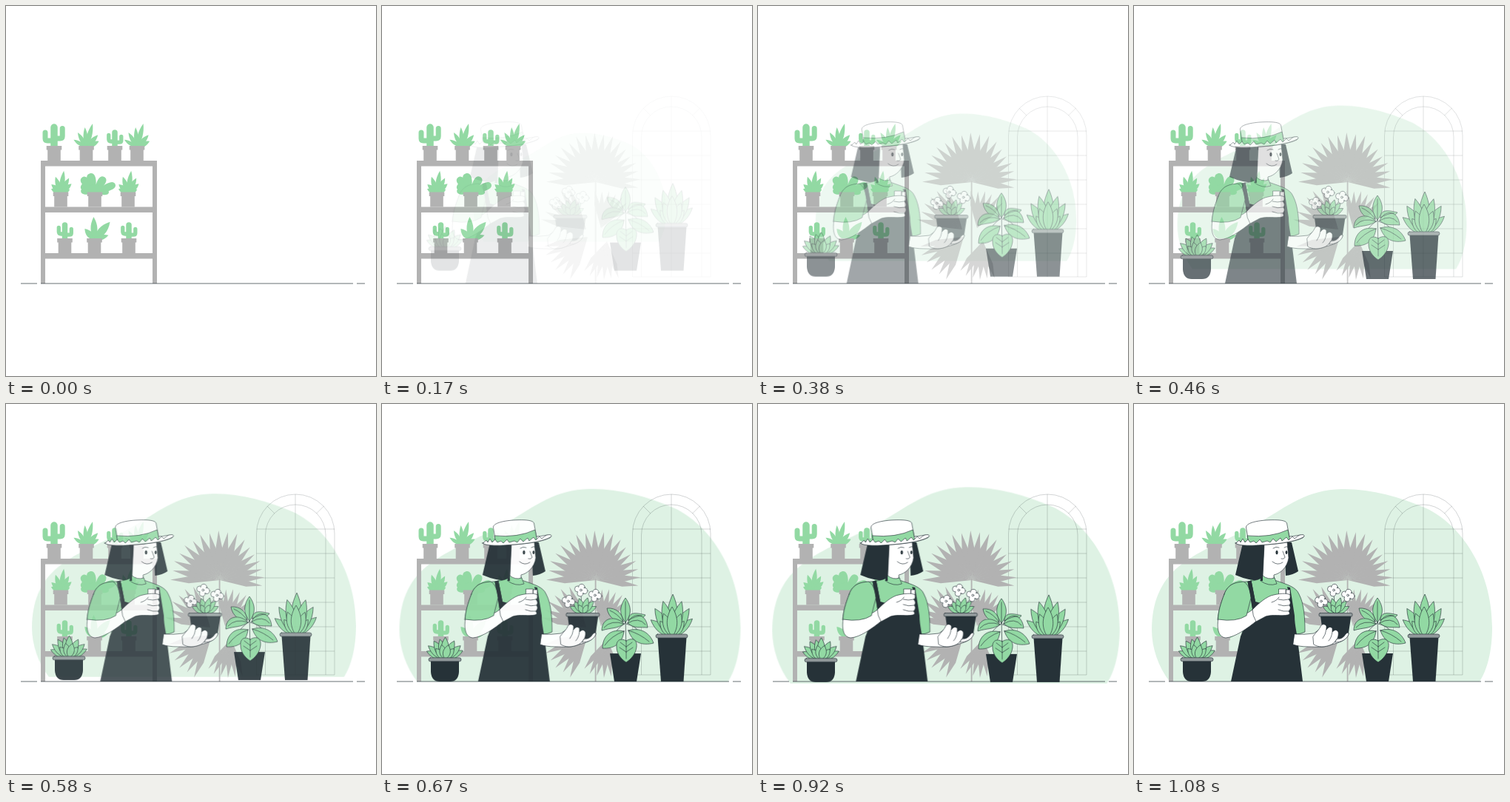
An HTML page without scripts that plays this animation: 500x500 px, repeating every 1120 ms.

```html
<!DOCTYPE html>
<html lang="en">
<head>
<meta charset="utf-8">
<title>Plant shop</title>
<style>
html, body { margin: 0; width: 100%; height: 100%; overflow: hidden; background: #fff; }
svg { display: block; width: 100%; height: 100%; }
.green { fill: #92d9a3; }
.gray { fill: #b2b2b2; }
.dark { fill: #263238; }
.white { fill: #fff; }
.rim { fill: #929a9c; }
.ink { stroke: #263238; stroke-width: .65; stroke-linejoin: round; stroke-linecap: round; }
.line { fill: none; }
.cactus { fill: none; stroke: #92d9a3; stroke-linecap: round; }
#leaf, #rib { vector-effect: non-scaling-stroke; }

.blob, .fade, .drop, .slide { animation: 1120ms infinite; }
.blob { animation-name: zoom; transform-origin: 254px 245px; }
.fade { animation-name: fade; }
.drop { animation-name: drop; }
.slide { animation-name: slide; }
@keyframes zoom {
  0% { opacity: 0; transform: scale(.5); animation-timing-function: cubic-bezier(.352,.041,.5,1.373); }
  88.2%, 100% { opacity: 1; transform: none; }
}
@keyframes fade {
  0% { opacity: 0; animation-timing-function: cubic-bezier(.352,.041,.5,1.373); }
  88.2%, 100% { opacity: 1; }
}
@keyframes drop {
  0% { opacity: 0; transform: translateY(-20px); animation-timing-function: cubic-bezier(.352,.041,.5,1.373); }
  88.2%, 100% { opacity: 1; transform: translateY(0); }
}
@keyframes slide {
  0% { opacity: 0; transform: translateX(-20px); animation-timing-function: cubic-bezier(.36,-.01,.5,1.38); }
  96.4%, 100% { opacity: 1; transform: translateX(0); }
}
</style>
</head>
<body>
<svg viewBox="0 0 500 500">
<defs>
  <path id="leaf" d="M0 0C-.5-.3-.5-.65 0-1C.5-.65 .5-.3 0 0Z"/>
  <path id="oval" d="M0 0C-.3-.3-.65-1 0-1S.3-.3 0 0Z"/>
  <g id="veined"><use href="#leaf"/><path id="rib" class="line" d="M0 0V-.85"/></g>
  <path id="pot" class="gray" d="M-10.3-20H10.3V-14.5H8.8V0H-8.8V-14.5H-10.3Z"/>
  <g id="cactus">
    <path class="cactus" stroke-width="7.5" d="M0-18V-38"/>
    <path class="cactus" stroke-width="5.3" d="M-8.2-34.5V-29Q-8.2-26-5-26H0M8.8-32.5V-27Q8.8-24.8 6-24.8H0"/>
    <use href="#pot"/>
  </g>
  <g id="bush">
    <g class="green" transform="translate(0 -18)">
      <use href="#leaf" transform="rotate(-59)scale(7 20)"/>
      <use href="#leaf" transform="rotate(-30)scale(8 23)"/>
      <use href="#leaf" transform="rotate(-4)scale(8 27)"/>
      <use href="#leaf" transform="rotate(15)scale(9 33)"/>
      <use href="#leaf" transform="rotate(43)scale(9 23)"/>
      <use href="#leaf" transform="rotate(64)scale(9 19)"/>
    </g>
    <use href="#pot"/>
  </g>
  <g id="spiky">
    <g class="green" transform="translate(0 -19)">
      <use href="#leaf" transform="rotate(-68)scale(9 14)"/>
      <use href="#leaf" transform="rotate(-48)scale(9 17)"/>
      <use href="#leaf" transform="rotate(-18)scale(9 23)"/>
      <use href="#leaf" transform="rotate(8)scale(9 30)"/>
      <use href="#leaf" transform="rotate(29)scale(9 23)"/>
      <use href="#leaf" transform="rotate(50)scale(9 19)"/>
      <use href="#leaf" transform="rotate(70)scale(9 13)"/>
    </g>
    <use href="#pot"/>
  </g>
  <path id="spoke" d="M0 0L-4.7-42L0-67L4.7-42Z"/>
  <g id="frond">
    <use href="#spoke" transform="rotate(-27.5)"/>
    <use href="#spoke" transform="rotate(-16.5)scale(.97)"/>
    <use href="#spoke" transform="rotate(-5.5)"/>
    <use href="#spoke" transform="rotate(5.5)scale(.98)"/>
    <use href="#spoke" transform="rotate(16.5)"/>
    <use href="#spoke" transform="rotate(27.5)scale(.96)"/>
  </g>
  <g id="flower" class="white">
    <g class="ink">
      <circle cx="-4.5" cy="-1.5" r="4"/><circle cx="1" cy="-4" r="4.2"/>
      <circle cx="5" cy="1" r="4"/><circle cx="-1" cy="4.5" r="4"/>
    </g>
    <circle r="4.6"/>
    <circle class="ink" r="1.4"/>
  </g>
</defs>

<path class="blob" fill="#def2e4" d="M280 115C318 114 358 125 395 141C440 162 484 222 484 302C484 335 477 360 467 375H48C33 355 24 330 24 305C24 268 36 240 60 220C90 195 130 183 170 160C208 137 235 116 280 115Z"/>

<!-- Shelf -->
<path class="gray" fill-rule="evenodd" d="M47 209H204V375H198V341.5H53V375H47ZM53 216.5V271.5H198V216.5ZM53 279V334H198V279Z"/>
<g transform="translate(65 209)">
  <path class="cactus" stroke-width="9.5" d="M0-18V-45"/>
  <path class="cactus" stroke-width="7" d="M-12-38V-30Q-12-27-9-27H0M11.2-43.5V-33Q11.2-30 8-30H0"/>
  <use href="#pot"/>
</g>
<use href="#bush" x="108.5" y="209"/>
<use href="#cactus" x="147" y="209"/>
<use href="#bush" x="177" y="209"/>
<use href="#spiky" x="74" y="271.5"/>
<g transform="translate(120 271.5)">
  <g class="green" transform="translate(0 -19)">
    <use href="#oval" transform="rotate(-80)scale(12 19)"/>
    <use href="#oval" transform="rotate(-61)scale(14 21)"/>
    <use href="#oval" transform="rotate(-40)scale(15 27)"/>
    <use href="#oval" transform="rotate(-14)scale(16 27)"/>
    <use href="#oval" transform="rotate(31)scale(15 25)"/>
    <use href="#oval" transform="rotate(67)scale(14 30)"/>
    <use href="#oval" transform="rotate(86)scale(10 19)"/>
    <circle cy="-5" r="7"/>
  </g>
  <use href="#pot"/>
</g>
<use href="#spiky" x="165" y="271.5"/>
<use href="#cactus" x="79.5" y="334"/>
<g transform="translate(119.5 334)">
  <g class="green" transform="translate(0 -18)">
    <use href="#leaf" transform="rotate(-41)scale(11 20)"/>
    <use href="#leaf" transform="rotate(-2)scale(12 31)"/>
    <use href="#leaf" transform="rotate(41)scale(14 32)"/>
    <use href="#leaf" transform="rotate(72)scale(9 20)"/>
  </g>
  <use href="#pot"/>
</g>
<use href="#cactus" x="166" y="334"/>

<!-- Window and palm -->
<g class="fade">
  <path class="line" stroke="#263238" stroke-opacity=".3" stroke-width=".7" d="M338.5 366V175A52.75 53 0 0 1 444 175V366ZM350.5 366V177A40.75 41 0 0 1 432 177V366M391 122V366M338.5 169H444M338.5 202H444M338.5 235H444M338.5 268H444M338.5 301H444M338.5 334H444M353 138L363 148M429.500 138L419.500 148"/>
  <g class="gray">
    <rect x="287.7" y="236" width="1.8" height="139"/>
    <use href="#frond" transform="translate(289 238)rotate(-62)"/>
    <use href="#frond" transform="translate(289 238)rotate(4)"/>
    <use href="#frond" transform="translate(289 238)rotate(70)scale(.9)"/>
    <use href="#frond" transform="translate(276 302)rotate(-50)scale(.93)"/>
    <use href="#frond" transform="translate(278 312)rotate(-130)scale(.93)"/>
    <use href="#frond" transform="translate(296 300)rotate(18)scale(.76)"/>
    <use href="#frond" transform="translate(304 318)rotate(190)scale(.78)"/>
  </g>
</g>

<path class="line" stroke="#263238" stroke-width=".7" d="M20 375H42M47 375H469M474 375H485"/>

<!-- Standing plants -->
<g class="drop">
  <g class="green ink" transform="translate(85 345)">
    <use href="#leaf" transform="rotate(-66)scale(12 27)"/>
    <use href="#leaf" transform="rotate(64)scale(12 27)"/>
    <use href="#leaf" transform="rotate(-51)scale(13 29)"/>
    <use href="#leaf" transform="rotate(49)scale(13 28)"/>
    <use href="#leaf" transform="rotate(-31)scale(14 29)"/>
    <use href="#leaf" transform="rotate(27)scale(14 28)"/>
    <use href="#leaf" transform="rotate(-14)scale(13 28)"/>
    <use href="#leaf" transform="rotate(1)scale(14 30)"/>
    <use href="#leaf" transform="rotate(-40)scale(12 19)"/>
    <use href="#leaf" transform="rotate(40)scale(12 19)"/>
    <use href="#leaf" transform="rotate(-13)scale(13 20)"/>
    <use href="#leaf" transform="rotate(14)scale(13 20)"/>
  </g>
  <path class="dark" d="M66 347H104V362Q103 375 92 375H78Q67 375 66 362Z"/>
  <rect class="rim ink" x="63" y="342.800" width="44" height="5" rx="2.5"/>

  <path class="dark" d="M308 337H350L344 375H314Z"/>
  <g class="green ink">
    <path class="line" d="M329 285L330 338M329 296Q318 303 313 312M330 297Q343 300 350 310"/>
    <use href="#veined" transform="translate(329 295)scale(17 33)"/>
    <path d="M326 294C315 295 306 288 304 276C316 275 325 282 326 294ZM333 292C333 280 344 282 356 285C351 292 342 296 333 292Z"/>
    <path d="M327 297C316 285 297 288 297 306C309 302 318 304 327 297ZM332 296C338 281 357 281 359 302C348 301 341 304 332 296Z"/>
    <path d="M327 307C310 303 298 313 298 330C313 331 325 324 327 307ZM333 306C349 301 362 309 367 323C351 327 338 322 333 306Z"/>
    <path class="line" d="M326 294Q318 283 308 279M333 292Q343 286 351 286M327 297Q310 291 300 302M332 296Q347 287 356 298M327 307Q310 313 301 326M333 306Q348 310 361 321"/>
    <path d="M330 320C340 314 345 320 344 328C343 338 336 345 330 349C322 344 317 336 317 328C316 320 322 315 330 320Z"/>
    <path class="line" d="M330 320V344M330 328L338 322M330 335L339 329M330 328L322 322M330 335L321 329"/>
  </g>

  <g class="green ink" transform="translate(392 315)">
    <use href="#leaf" transform="rotate(-51)scale(15 37)"/>
    <use href="#leaf" transform="rotate(48)scale(15 37)"/>
    <use href="#leaf" transform="rotate(-31)scale(18 45)"/>
    <use href="#leaf" transform="rotate(31)scale(18 45)"/>
    <use href="#leaf" transform="rotate(1)scale(19 58)"/>
    <use href="#leaf" transform="rotate(-14)scale(18 50)"/>
    <use href="#leaf" transform="rotate(15)scale(18 50)"/>
    <use href="#leaf" transform="rotate(-37)scale(15 27)"/>
    <use href="#leaf" transform="rotate(37)scale(15 27)"/>
    <use href="#leaf" transform="rotate(-20)scale(16 34)"/>
    <use href="#leaf" transform="rotate(21)scale(16 34)"/>
    <use href="#leaf" transform="scale(18 41)"/>
  </g>
  <path class="dark" d="M372.500 315H411.500L407.500 375H377Z"/>
  <rect class="rim ink" x="370" y="311" width="43" height="5" rx="2.5"/>
</g>

<!-- Gardener -->
<g class="slide">
  <path class="dark" d="M147 188L137 231Q155 239 174 239L180 188ZM203 186L213 187L222 226Q215 231 205 232Z"/>
  <path class="green ink" d="M175 233C170 238 160 239 152 240C138 241 127 242 122 257C117 270 114 280 113 292Q135 295 148 287L146 312H220L217 311Q226 311 231 308C231 290 230 270 223 257C219 247 207 244 190 238L189 233Z"/>
  <path class="white ink" d="M176 190L174 233Q182 241 189 239L189 231C198 229 207 221 209 208L207 186Z"/>
  <path class="green ink" d="M174 232Q181 238 190 235L193 243Q182 247 171 239Z"/>
  <path class="dark" d="M176 189L174 228V239H171V189Z"/>
  <ellipse class="dark" cx="193" cy="200.500" rx="1.6" ry="2.700"/>
  <ellipse class="dark" cx="206" cy="200.500" rx="1.4" ry="2.500"/>
  <path class="line ink" d="M188 195Q192 192 196 194M203 194Q206 192 208 193M201 199L204 207Q203 210 199 209M187 213Q194 219 201 214"/>

  <path class="dark" d="M153.500 240L158.500 238.500L164 267C178 272 198 271 211 263L207 247L211 248L217 286C217 300 221 312 222 326L228 375H131L144 314C149 302 158 290 160 277Z"/>

  <!-- Hat -->
  <path class="white ink" d="M137 188C143 184 150 187 155 186L210 179C218 179 224 176 229 177Q231 179 228 181C215 187 190 190 170 190.500C155 191 138 191 137 188Z"/>
  <path class="white ink" d="M155 187L151.500 167C151 161 165 158 178 157C195 156 205 157 206.500 161L210 180Q183 191 155 187Z"/>
  <path class="green ink" d="M153.500 178Q185 181 208 170L210.500 183Q184 190 155.500 188Z"/>
  <path class="white ink" d="M138 188L142 184L144 187L147 182L150 187L154 183L157 187L162 185L165 188L170 183L173 187L180 185L184 187L188 182L192 186L198 181L200 185L206 180L209 184L214 179L217 182L222 178C226 176 231 176 230 179C220 186 195 189 172 190.500C155 192 138 191 138 188Z"/>

  <!-- Near arm -->
  <path class="white ink" d="M114 289C123 292 148 288 160 278L167 292C152 304 137 315 124 316C113 315 112 302 114 289Z"/>
  <path class="green ink" d="M122 257C117 270 114 280 113.500 291Q138 295 152 286L158 262C157 251 154 243 148 240C137 241 127 243 122 257Z"/>
  <path class="dark" d="M153.500 240L158.500 238.500L164 267L160 277L158 262Z"/>
  <path class="white ink" d="M196 250H205.500V258H196ZM205.500 251H211V258H205.500Z"/>
  <path class="white ink" d="M160 278C166 272 175 263 185 259C195 256 207 255 211 258Q212 262 209 264Q213 268 210 272Q213 276 209 280Q212 284 208 285C199 287 188 284 178 287L165 294Q160 286 160 278Z"/>
  <path class="line ink" d="M209 264Q202 266 195 264M210 272Q202 274 195 271M209 280Q202 281 195 278M186 268Q193 266 196 261"/>

  <!-- Far arm and flower pot -->
  <path class="white ink" d="M217 311Q230 312 243 310L257 300L272 310L285 310Q291 306 290 311C287 320 276 323 267 325C256 330 245 328 236 328Q223 328 215 325Z"/>
  <g class="line ink"><path d="M268 278L254 267M271 277L270 252M274 278L288 260"/></g>
  <g class="green ink" transform="translate(273 283)">
    <use href="#leaf" transform="rotate(-62)scale(10 20)"/>
    <use href="#leaf" transform="rotate(62)scale(10 20)"/>
    <use href="#leaf" transform="rotate(-38)scale(10 21)"/>
    <use href="#leaf" transform="rotate(40)scale(10 22)"/>
    <use href="#leaf" transform="rotate(-15)scale(11 21)"/>
    <use href="#leaf" transform="rotate(16)scale(11 22)"/>
    <use href="#leaf" transform="rotate(-28)scale(9 13)"/>
    <use href="#leaf" transform="rotate(28)scale(9 13)"/>
  </g>
  <use href="#flower" x="253" y="266.500"/>
  <use href="#flower" x="270" y="251.500"/>
  <use href="#flower" x="289" y="258.500"/>
  <path class="dark" d="M252 286H293.500L290 309Q288 316 281 317H262Q256 316 255 309Z"/>
  <rect class="rim ink" x="250" y="282.500" width="45" height="4.600" rx="1.500"/>
  <path class="white ink" d="M242 314C246 308 250 306 253 299Q257 296 260 300L260 305Q264 299 268 303L268 308Q273 303 276 308C277 315 274 320 267 325C258 329 249 329 243 325Z"/>
  <path class="line ink" d="M260 304Q259 312 255 317M268 308Q267 316 263 320"/>
  <path class="white ink" d="M274 318Q282 318 286 311Q290 307 290 311C288 318 280 322 272 322Z"/>
</g>
</svg>
</body>
</html>
```
